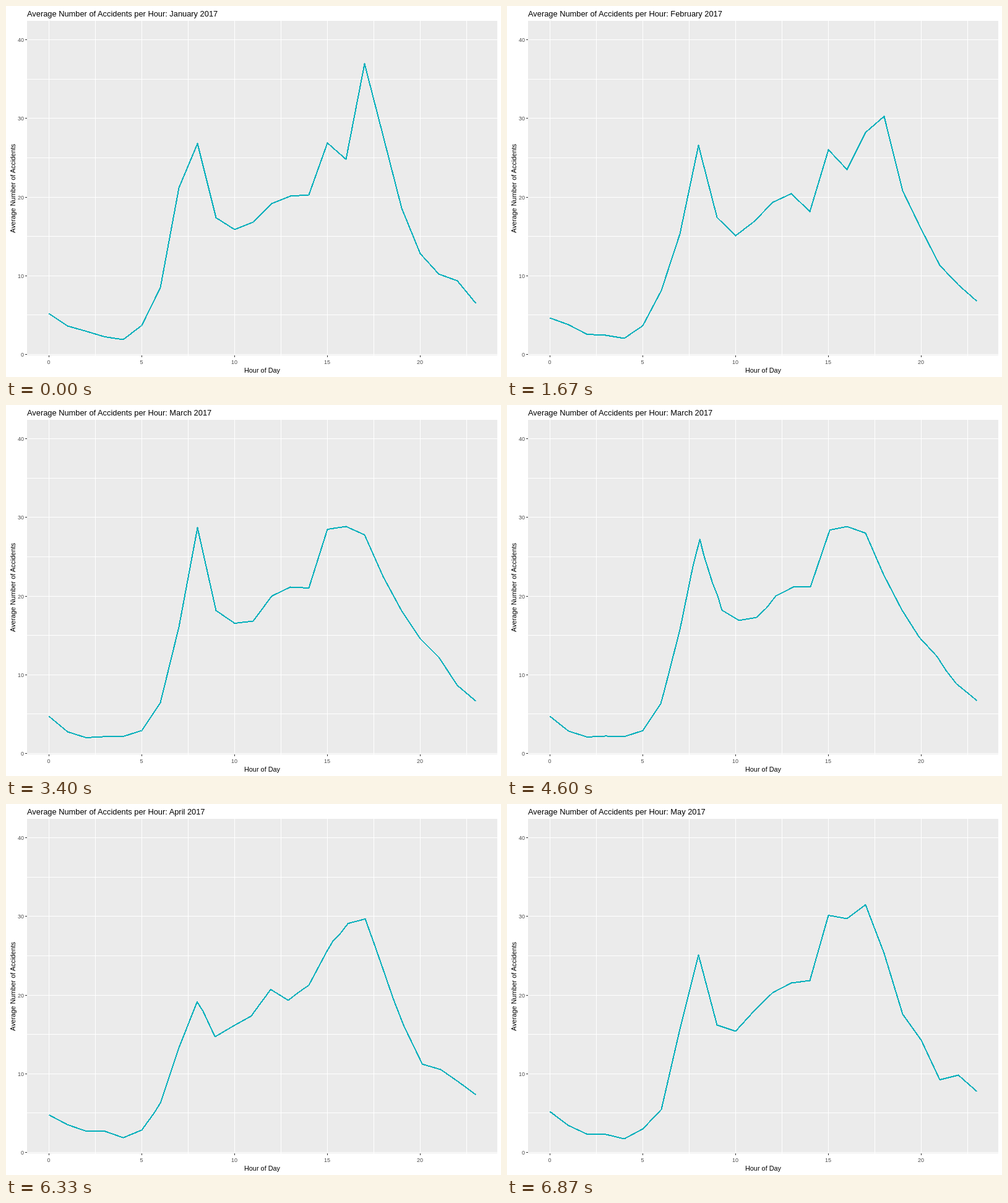
Write an HTML page that moves like this. It is 800 px wide and 600 px high and loops after 8000 ms.

```html
<!DOCTYPE html>
<html lang="en">
<head>
<meta charset="utf-8">
<title>Accidents per hour</title>
<style>
  html, body { margin: 0; width: 100%; height: 100%; overflow: hidden; background: #fff; }
  svg { display: block; width: 800px; height: 600px; font-family: "Liberation Sans", Arial, sans-serif; }
  .panel { fill: #ebebeb; }
  .grid { stroke: #fff; shape-rendering: crispEdges; }
  .tick { stroke: #333; shape-rendering: crispEdges; }
  .num { font-size: 9px; fill: #4d4d4d; }
  .axis { font-size: 10.9px; text-anchor: middle; }
  #title { font-size: 12.85px; }
  #line { fill: none; stroke: #00afbb; stroke-width: 2; stroke-linejoin: round; shape-rendering: crispEdges; }
</style>
</head>
<body>
<svg viewBox="0 0 800 600">
  <rect class="panel" x="34" y="24" width="760" height="541"/>
  <g id="axes"></g>
  <polyline id="line"/>
  <text id="title" x="34" y="17"></text>
  <text class="axis" x="414" y="593">Hour of Day</text>
  <text class="axis" transform="translate(15 295) rotate(-90)">Average Number of Accidents</text>
</svg>
<script>
const X0 = 69.5, HOUR = 30, UNIT = 12.725, POINTS = 50;
const LOOP = 8000, CYCLE = 26, STEPS = 9;

// Vertical position of the curve at each hour of the day
const months = [
  ['January', [497.5, 517.5, 526, 535, 539.5, 516.5, 455.5, 294, 222.5, 342.5, 361.5, 349.5,
    319.5, 307.5, 305.5, 221.5, 248, 93.5, 210, 327, 400.5, 433.5, 444.5, 481]],
  ['February', [504.5, 515.5, 531, 532.5, 537.5, 517, 460, 368.5, 225.5, 342, 371.5, 348.5,
    317.5, 303.5, 332.5, 232.5, 264.5, 204.5, 178.5, 299, 361, 419.5, 451, 477.5]],
  ['March', [503.5, 528.5, 538, 536.3, 536, 526.5, 481.5, 359, 198.5, 332.5, 353, 349.5,
    309, 294.5, 296, 201, 196.5, 210, 277.5, 333, 378, 408, 453.5, 479]],
  ['April', [503.5, 518.5, 528.5, 528.5, 539.5, 527.5, 484, 398, 326.5, 386, 360, 340,
    297.5, 319, 294, 242, 197, 185.5, 270, 355.5, 417.5, 428.5, 449, 471]],
  ['May', [497.5, 520, 534, 534.3, 541.5, 525.5, 494, 364, 244, 357.5, 367.5, 334.5,
    305, 289.5, 285.5, 180, 185.5, 163, 241.5, 340, 382, 446, 438.5, 465]]
].map(([name, ys]) => ({ name, path: resample(ys) }));

// Split the longer half of the edges in proportion to length until the path has POINTS points
function resample(ys) {
  const edges = ys.slice(1).map((y, i) => ({ i, length: Math.hypot(1, (y - ys[i]) / UNIT), cuts: 0 }));
  const long = [...edges].sort((a, b) => b.length - a.length).slice(0, Math.ceil(edges.length / 2));
  const total = long.reduce((sum, e) => sum + e.length, 0);
  let spare = POINTS - ys.length;
  const scale = spare / total;
  for (const e of long) {
    e.cuts = Math.floor(e.length * scale);
    e.rest = e.length * scale - e.cuts;
    spare -= e.cuts;
  }
  long.sort((a, b) => b.rest - a.rest).slice(0, spare).forEach(e => e.cuts++);

  const path = [[X0, ys[0]]];
  for (const { i, cuts } of edges) {
    for (let k = 1; k <= cuts + 1; k++) {
      const p = k / (cuts + 1);
      path.push([X0 + HOUR * (i + p), ys[i] + (ys[i + 1] - ys[i]) * p]);
    }
  }
  return path;
}

function buildAxes() {
  const line = (cls, x1, y1, x2, y2) =>
    `<line class="${cls}" x1="${x1}" y1="${y1}" x2="${x2}" y2="${y2}"/>`;
  const label = (x, y, anchor, value) =>
    `<text class="num" x="${x}" y="${y}" text-anchor="${anchor}">${value}</text>`;
  let out = '';
  for (let v = 0; v <= 40; v += 5) {
    const y = Math.floor(563.6 - v * UNIT) + 0.5;
    out += line('grid', 34, y, 794, y);
    if (v % 10 === 0) out += line('tick', 31, y, 34, y) + label(29, y + 3.5, 'end', v);
  }
  for (let h = 0; h <= 22.5; h += 2.5) {
    const x = X0 + h * HOUR;
    out += line('grid', x, 24, x, 565);
    if (h % 5 === 0) out += line('tick', x, 565, x, 568) + label(x - 0.5, 579, 'middle', h);
  }
  document.getElementById('axes').innerHTML = out;
}

const curve = document.getElementById('line');
const title = document.getElementById('title');
let shown = -1;

function draw(now) {
  // 15 pictures a second, started on whole hundredths
  const tick = Math.floor((Math.floor((now % LOOP) / 10) + 0.5) * 0.15) + STEPS;
  if (tick !== shown) {
    shown = tick;
    const index = Math.floor(tick / CYCLE);
    const p = Math.min(1, (tick % CYCLE + 1) / STEPS);
    const to = months[index], from = months[Math.max(0, index - 1)];
    curve.setAttribute('points', from.path.map(([x, y], i) => {
      const [tx, ty] = to.path[i];
      return `${(x + (tx - x) * p).toFixed(2)},${(y + (ty - y) * p).toFixed(2)}`;
    }).join(' '));
    title.textContent = `Average Number of Accidents per Hour: ${(p > 0.5 ? to : from).name} 2017`;
  }
  requestAnimationFrame(draw);
}

buildAxes();
draw(performance.now());
</script>
</body>
</html>
```
